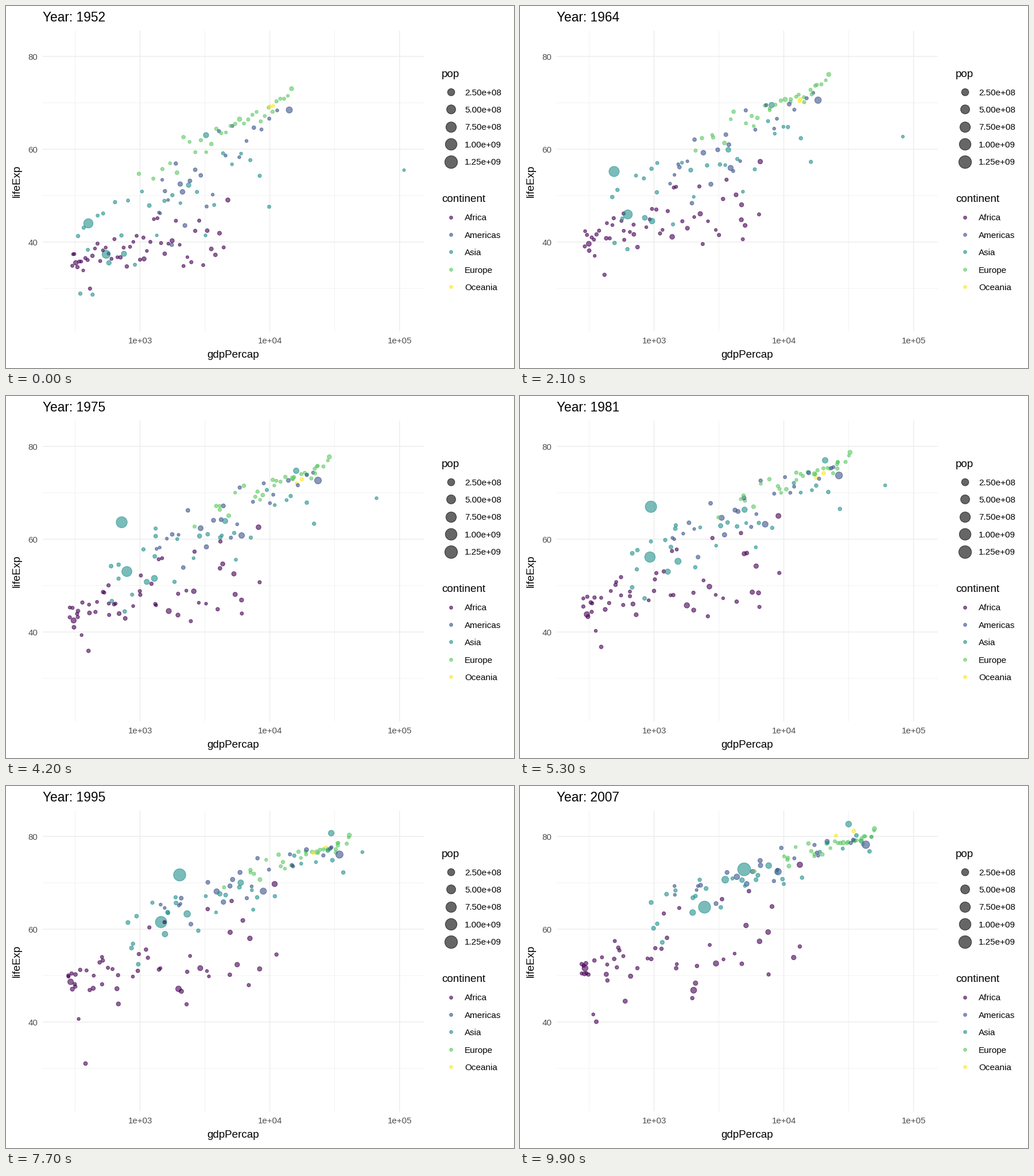
Animation, 885 px wide and 632 px high, one loop 10000 ms. Source, as a matplotlib script:

```python
import numpy as np
import matplotlib.pyplot as plt
from matplotlib.animation import FuncAnimation

W, H, DPI = 885, 632, 64
FRAMES = 100
PT = 72 / DPI
GREY, GRID = "#4D4D4D", "#EBEBEB"
COLORS = {"Africa": "#440154", "Americas": "#3B528B", "Asia": "#21908C",
          "Europe": "#5DC863", "Oceania": "#FDE725"}

plt.rcParams["font.family"] = "Liberation Sans"
rng = np.random.default_rng(7)
ticks = np.arange(FRAMES)
time = ticks / (FRAMES - 1)
knots = ticks[::9]  # the data has one record every five years

# Big bubbles: population in millions (first, last), then three points passed
MID = 0.424
LEADERS = [
    ("Asia", (556, 1319), (143, 379), (201, 220), (390, 145)),
    ("Asia", (372, 1110), (174, 433), (210, 306), (321, 211)),
    ("Asia", (86, 127), (348, 225), (505, 130), (572, 66)),
    ("Asia", (82, 223), (205, 432), (258, 318), (357, 163)),
    ("Asia", (0.2, 2.5), (693, 286), (645, 178), (612, 88)),
    ("Americas", (157, 301), (493, 181), (543, 147), (602, 102)),
    ("Americas", (56, 190), (307, 324), (410, 243), (449, 149)),
    ("Africa", (33, 135), (240, 441), (283, 375), (302, 356)),
    ("Oceania", (9, 20), (459, 175), (515, 145), (581, 78)),
    ("Oceania", (2, 4), (465, 174), (506, 152), (550, 86)),
]

# Crowds: count, population growth, then for the first and last year
# (x low, x high, x skew, y at low, y at high, spread at low, spread at high)
CROWDS = {
    "Africa": (51, 3, (115, 386, 1.35, 450, 385, 32, 36),
               (107, 487, 1.6, 345, 215, 55, 60)),
    "Americas": (23, 2.4, (266, 472, 1.5, 345, 190, 60, 15),
                 (251, 586, 0.9, 195, 90, 28, 12)),
    "Asia": (28, 2.8, (125, 458, 1.35, 420, 270, 60, 50),
             (228, 612, 1.3, 225, 88, 35, 15)),
    "Europe": (30, 1.2, (231, 497, 0.7, 295, 152, 22, 12),
               (408, 617, 0.5, 138, 82, 12, 8)),
}
# One dot of a crowd drops for a while: tick, depth
CRISES = {"Africa": (72, 150), "Asia": (45, 130)}

dots = []  # (continent, x track, y track, diameter track)


def diameter(size):
    """Pixel diameter of a point of the given plot size."""
    return (2.845 * size + 0.94) * 1.25


def bubble(pop):
    return diameter(1 + 5 * np.sqrt(pop / 1319))


def curve(points):
    return np.polyval(np.polyfit([0, MID, 1], points, 2), time)


def add(group, x, y, pop0, pop1):
    dots.append((group, x, y, bubble(pop0 + (pop1 - pop0) * time)))


def walk(scale):
    """A random walk from zero, one step per record."""
    steps = rng.normal(0, scale, len(knots))
    steps[0] = 0
    return steps.cumsum()


def add_crowd(group, count, growth, first, last):
    ease = (knots / knots[-1]) ** 0.7
    lo, hi, skew, y_lo, y_hi, s_lo, s_hi = (
        a + (b - a) * ease for a, b in zip(first, last))
    for k, rank in enumerate(np.linspace(0, 1, count)):
        u = np.clip(rank + walk(0.012), 0, 1) ** skew
        off = np.clip(rng.normal(0, 0.9) + walk(0.1), -1.3, 1.6)
        x = np.interp(ticks, knots, lo + (hi - lo) * u)
        y = np.interp(ticks, knots, y_lo + (y_hi - y_lo) * u
                      + off * (s_lo + (s_hi - s_lo) * u))
        if group in CRISES and k == count // 5:
            when, depth = CRISES[group]
            y += depth * np.clip(1 - abs(ticks - when) / 9, 0, 1)
        pop = np.clip(rng.lognormal(1.5, 1.1), 0.2, 45)
        add(group, x, y, pop, pop * growth)


for group, pops, *stops in LEADERS:
    xs, ys = zip(*stops)
    add(group, curve(xs), curve(ys), *pops)
for group, spec in CROWDS.items():
    add_crowd(group, *spec)

dots = [dots[i] for i in rng.permutation(len(dots))]
X, Y, D = (np.array([d[i] for d in dots]) for i in (1, 2, 3))

fig = plt.figure(figsize=(W / DPI, H / DPI), dpi=DPI, facecolor="white")
ax = fig.add_axes([0, 0, 1, 1])
ax.set(xlim=(0, W), ylim=(H, 0))
ax.axis("off")


def label(x, y, s, px=15.2, color="black", **kw):
    return ax.text(x, y, s, fontsize=px * PT, color=color,
                   va="baseline", **kw)


def points(x, y, d, color):
    return ax.scatter(x, y, s=(d * PT) ** 2, c=color, alpha=0.6,
                      linewidths=1.18 * PT, zorder=3)


def grid(x0, y0, width):
    style = dict(color=GRID, lw=width * PT, snap=False, zorder=1)
    for i in range(3):
        ax.vlines(x0 + 226.1 * i, 43, 568, **style)
        ax.hlines(y0 + 162 * i, 64, 728, **style)


grid(120.5, 169, 0.67)
grid(233.5, 88, 1.33)

for i in range(3):
    label(233.5 + 226.1 * i, 589, f"1e+0{3 + i}", 15, GREY, ha="center")
    label(55.5, 93.5 + 162 * i, f"{80 - 20 * i}", 15, GREY, ha="right")
label(395.5, 614, "gdpPercap", 18.9, ha="center")
label(24, 305.5, "lifeExp", 18.9, ha="center", rotation=90,
      rotation_mode="anchor")
title = label(63.5, 27, "", 22.7)

label(759, 124, "pop", 18.9)
label(759, 342, "continent", 18.9)
for i, (name, color) in enumerate(COLORS.items()):
    y, pop = 30.4 * i, 250 * (i + 1)
    points(774.5, 150 + y, bubble(pop), "black")
    label(799, 155.5 + y, f"{pop * 1e6:.2e}")
    points(774.5, 368.5 + y, diameter(1.25), color)
    label(799, 374.5 + y, name)

cloud = points(X[:, 0], Y[:, 0], D[:, 0], [COLORS[d[0]] for d in dots])


def draw(i):
    cloud.set_offsets(np.column_stack([X[:, i], Y[:, i]]) + 0.5)
    cloud.set_sizes((D[:, i] * PT) ** 2)
    title.set_text(f"Year: {round(1952 + 55 * time[i])}")
    return cloud, title


anim = FuncAnimation(fig, draw, frames=FRAMES, interval=100, repeat=True,
                     repeat_delay=0, init_func=lambda: draw(0))
plt.show()
```
